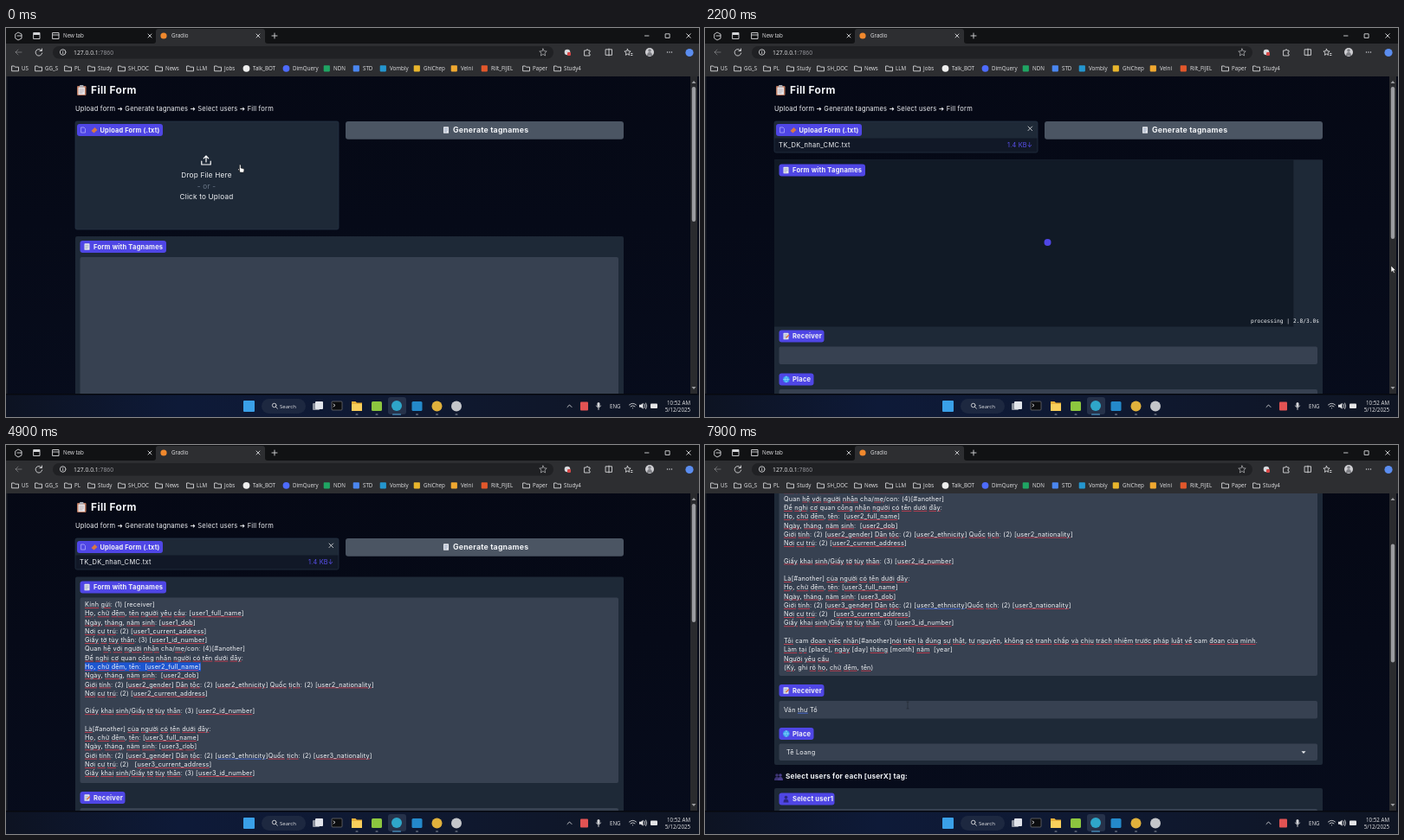
An HTML page that plays this animation: 800 by 450 pixels, repeating every 8000 ms.

```html
<!DOCTYPE html>
<html lang="en">
<head>
<meta charset="utf-8">
<title>Fill Form</title>
<style>
  html, body { margin: 0; width: 100%; height: 100%; overflow: hidden; background: #050916; }
  svg { display: block; width: 800px; height: 450px; }
  text { font-family: Inter, "Open Sans", sans-serif; fill: #f1f3f6; letter-spacing: .2px; white-space: pre; }
  .b { font-weight: 700; }
  .ui { font-family: "Open Sans", "Noto Sans", sans-serif; letter-spacing: 0; fill: #e4e4e6; }
  .mono { font-family: "DejaVu Sans Mono", "Liberation Mono", monospace; letter-spacing: 0; }
  .bad { fill: #e23b4e; text-decoration: underline; }
  .hint { fill: #4b74f0; text-decoration: underline; }
  .ok { fill: #f1f3f6; text-decoration: none; }
  .line { fill: none; stroke: #d6d7da; stroke-width: .9; stroke-linecap: round; stroke-linejoin: round; }
</style>
</head>
<body>
<svg id="stage" viewBox="0 0 800 450" xmlns="http://www.w3.org/2000/svg"></svg>
<script>
const LOOP = 8000, INDIGO = '#4f46e5', PANEL = '#1e2937', FIELD = '#374151';

const FORM = `CỘNG HOÀ XÃ HỘI CHỦ NGHĨA VIỆT NAM
  Độc lập - Tự do - Hạnh phúc

TỜ KHAI ĐĂNG KÝ NHẬN CHA, MẸ, CON

Kính gửi: (1) [receiver]
Họ, chữ đệm, tên người yêu cầu: [user1_full_name]
Ngày, tháng, năm sinh: [user1_dob]
Nơi cư trú: (2) [user1_current_address]
Giấy tờ tùy thân: (3) [user1_id_number]
Quan hệ với người nhận cha/mẹ/con: (4)[#another]
Đề nghị cơ quan công nhận người có tên dưới đây:
Họ, chữ đệm, tên:  [user2_full_name]
Ngày, tháng, năm sinh:  [user2_dob]
Giới tính: (2) [user2_gender] Dân tộc: (2) [user2_ethnicity] Quốc tịch: (2) [user2_nationality]
Nơi cư trú: (2) [user2_current_address]

Giấy khai sinh/Giấy tờ tùy thân: (3) [user2_id_number]

Là[#another] của người có tên dưới đây:
Họ, chữ đệm, tên: [user3_full_name]  
Ngày, tháng, năm sinh: [user3_dob]
Giới tính: (2) [user3_gender] Dân tộc: (2) [user3_ethnicity]Quốc tịch: (2) [user3_nationality]
Nơi cư trú: (2)   [user3_current_address]
Giấy khai sinh/Giấy tờ tùy thân: (3) [user3_id_number]

Tôi cam đoan việc nhận[#another]nói trên là đúng sự thật, tự nguyện, không có tranh chấp và chịu trách nhiệm trước pháp luật về cam đoan của mình.
Làm tại [place], ngày [day] tháng [month] năm  [year]
Người yêu cầu
(Ký, ghi rõ họ, chữ đệm, tên)`.split('\n');
const RECEIVER = 'Văn thư Tổ', PLACE = 'Tê Loang';

// Markup helpers
const rect = (x, y, w, h, fill, r = 0, extra = '') =>
  `<rect x="${x}" y="${y}" width="${w}" height="${h}" rx="${r}" fill="${fill}" ${extra}/>`;
const circle = (x, y, r, fill) => `<circle cx="${x}" cy="${y}" r="${r}" fill="${fill}"/>`;
const line = (d, extra = '') => `<path class="line" d="${d}" ${extra}/>`;
const text = (x, y, s, size, extra = '') => `<text x="${x}" y="${y}" font-size="${size}" ${extra}>${s}</text>`;
const ui = (x, y, s, size = 6.2, extra = '') => text(x, y, s, size, `class="ui" ${extra}`);
const bold = (x, y, s, size, extra = '') => text(x, y, s, size, `class="b" ${extra}`);
const page = (x, y, fill = '#e6e8ee') =>
  rect(x, y, 6, 7.5, fill, .6) + line(`M${x + 1.3} ${y + 2}h3.2m-3.2 1.8h3.2m-3.2 1.8h2.2`, 'style="stroke:#7386a8;stroke-width:.6"');
const badge = (x, y, w, label, icon) => rect(x, y, w, 14, INDIGO, 3) + icon + bold(x + 15.5, y + 9.6, label, 7.55);
const person = (x, y, fill) => circle(x, y - 2, 1.8, fill) + `<path d="M${x - 3} ${y + 4}q0-4 3-4t3 4z" fill="${fill}"/>`;
const cross = (x, y, r = 2) => line(`M${x - r} ${y - r}l${2 * r} ${2 * r}m0 ${-2 * r}l${-2 * r} ${2 * r}`);

function spellcheck(s) {
  return s.replace(/[\p{L}\d_]+/gu, word => {
    const wrong = /[^\x00-\x7f]|_|^(sinh|khai|KHAI|tranh|NAM)$/.test(word);
    const kind = /^user3_eth/.test(word) ? 'hint' : 'bad';
    return wrong ? `<tspan class="${kind}"><tspan class="ok">${word}</tspan></tspan>` : word;
  });
}

function browser() {
  const folders = [[18, 'US'], [45, 'GG_S'], [79, 'PL'], [106, 'Study'], [141, 'SH_DOC'], [184, 'News'],
    [220, 'LLM'], [252, 'Jobs'], [608, 'Paper'], [644, 'Study4']];
  const sites = [[285, 'Talk_BOT', '#eeeeee', 1], [331, 'DimQuery', '#4d6bfe', 1], [378, 'NDN', '#1fa463'],
    [412, 'STD', '#4a86f0'], [443, 'Vombly', '#2496cf'], [482, 'GhiChep', '#e8b52c'],
    [525, 'Velni', '#f0a830'], [560, 'Rilt_FIJEL', '#e2572b']];
  return rect(0, 0, 800, 56, '#111214') +
    `<path d="M170 18q3 0 3-3v-11q0-3 3-3h120q3 0 3 3v11q0 3 3 3z" fill="#2d2e31"/>` +
    rect(0, 18, 800, 38, '#2d2e31') + rect(54, 21, 578, 14.5, '#202124', 7) +
    line('M11 7l3-2 4 2v5l-4 2-3-2zM13 9h5M32 5.5h7v7h-7z') + rect(32, 5.5, 7, 2.5, '#d6d7da') +
    line('M54 5.5h7v7h-7zm0 2.5h7') + ui(66, 11.3, 'New tab') + cross(166, 9) +
    circle(182, 9, 3.6, '#f0882d') + ui(191, 11.3, 'Gradio') + cross(291, 9) + line('M307 9h6m-3-3v6') +
    line('M737.5 9h4.5M761.5 6.8h4.6v4.6h-4.6z') + cross(788, 9, 2.3) +
    line('M18 28h-7l3-3m-3 3l3 3', 'opacity=".4"') + line('M41 26a3.8 3.8 0 1 0 .7 3M41.5 24v2.5h-2.5') +
    line('M69 28a3.3 3.3 0 1 0-6.6 0a3.3 3.3 0 1 0 6.6 0M65.7 27.8v1.7m0-3.2v.1') +
    ui(78, 30.5, '127.0.0.1<tspan fill="#9a9ba0">:7860</tspan>', 6.8) +
    line('M620 24l1.2 2.7 3 .3-2.2 2 .6 3-2.6-1.6-2.6 1.6.6-3-2.2-2 3-.3z', 'opacity=".65"') +
    circle(648, 28, 3.3, '#d9d9dd') + rect(648, 28, 4, 4, '#d94848', 1) +
    line('M668 26h2q1-3 2 0h2v2q-3 1 0 2v2h-6z') + line('M692.5 24.8h7v6.5h-7zM696 24v8') +
    line('M717.5 24.3l1 2.4 2.6.3-2 1.8.5 2.6-2.1-1.3-2.1 1.3.5-2.6-2-1.8 2.6-.3zM721.5 29.5h1.5m-1.5 2h1.5') +
    circle(743, 28, 5, '#cfcfd3') + person(743, 28, '#7f8085') +
    [763.5, 766, 768.5].map(x => circle(x, 28, .7, '#d6d7da')).join('') + circle(789, 28.5, 4.6, '#5b8def') +
    folders.map(([x, s]) => line(`M${x - 11} 44h2.5l1 1.2h4v4.6h-7.5z`) + ui(x, 49, s)).join('') +
    sites.map(([x, s, c, round]) =>
      (round ? circle(x - 7.5, 46.8, 3.9, c) : rect(x - 11.3, 43.2, 7.2, 7.2, c, .8)) + ui(x, 49, s)).join('');
}

function taskbar() {
  const apps = [[428, '#8cc63f'], [474.5, '#2489ca']];
  return rect(0, 423, 800, 27, 'url(#dusk)') + rect(0, 423, 800, 1.5, '#07090f') +
    rect(274, 431, 13, 13, '#3aa0e8', 1) + rect(295, 429, 51, 17, '#1d2840', 8.5) +
    line('M312 436.5a2.3 2.3 0 1 0-4.6 0a2.3 2.3 0 1 0 4.6 0M311.4 438.2l2 2') + ui(316, 440, 'Search', 6) +
    rect(354, 434, 8, 8, '#8b919d', 1) + rect(357, 432, 9, 9, '#e1e4ea', 1) +
    rect(376, 432, 12, 10, '#0b0c0e', 1, 'stroke="#777" stroke-width=".7"') + line('M378 435l2 1.5-2 1.5') +
    '<path d="M399 432h4.5l1.5 1.5h6v9.5h-12z" fill="#e9b13a"/>' + rect(399, 435, 12, 8, '#f8cf5c', .8) +
    rect(441, 427, 21, 20, '#26324a', 3) +
    apps.map(([x, c]) => rect(x - 6, 432, 12, 11, c, 1.5)).join('') +
    circle(451, 437, 6, '#2fa6c9') + circle(497.5, 437.5, 6, '#e0b13c') + circle(520, 437.5, 6, '#c4c6ca') +
    [405, 428, 474.5, 497.5, 520].map(x => rect(x - 1.5, 446.5, 3, 1, '#8d949f', .5)).join('') +
    rect(446, 446.5, 10, 1, '#58b4e8', .5) +
    line('M648 438.5l2.5-2.5 2.5 2.5') + rect(663, 432.5, 9, 10, '#e25353', 1) +
    rect(682.5, 433, 3, 5.5, '#d6d7da', 1.5) + line('M681.5 437q2.5 4.5 5 0M684 439.5v2') +
    ui(697, 439.8, 'ENG') + line('M719.5 436q4-3.5 8 0M721 437.8q2.5-2 5 0M723.4 439.8h.2') +
    `<path d="M731 435.7h2l2.5-2v7l-2.5-2h-2z" fill="#e4e4e6"/>` + line('M737 435q1.5 2.2 0 4.5M738.7 434q2 3.2 0 6.5') +
    rect(744, 434.5, 8, 5.5, '#e4e4e6', 1) +
    ui(790, 435.5, '10:52 AM', 6.2, 'text-anchor="end"') + ui(790, 443.5, '5/12/2025', 6.2, 'text-anchor="end"');
}

const uploadBadge = rect(82, 111, 99, 14, INDIGO, 3) + line('M87 115h3l1.5 1.5v4.5h-4.5z', 'style="stroke:#b9b5ff;stroke-width:.7"') +
  `<path d="M98.5 119l4-4 3 3-4 3.5z" fill="#d87845"/>` + bold(108.5, 120.7, 'Upload Form (.txt)', 7.4);

const dropZone = rect(80, 108, 304, 125, PANEL, 2, 'stroke="#283548" stroke-width=".7"') +
  line('M231 155v-7m-2.8 2.8l2.8-2.8 2.8 2.8M225.8 154v4h10.4v-4', 'style="stroke:#fff;stroke-width:1.2"') +
  text(231.5, 173, 'Drop File Here', 8.2, 'text-anchor="middle"') +
  text(231.5, 185.8, '- or -', 8.2, 'text-anchor="middle" style="fill:#6b7789"') +
  text(231.5, 198.2, 'Click to Upload', 8.2, 'text-anchor="middle"');

const uploadedFile = rect(80, 108, 304, 36, PANEL, 2, 'stroke="#283548" stroke-width=".7"') +
  rect(80.5, 127.5, 303, 16, '#111827') + cross(375.3, 116.3, 2.3) +
  text(85, 138.3, 'TK_DK_nhan_CMC.txt', 7.5, 'style="letter-spacing:.3px"') +
  text(378, 138.3, '1.4 KB↓', 7.3, 'text-anchor="end" style="fill:#5a50ee"');

const clipboard = rect(82, 67, 10.5, 11, '#b9785f', 1.2) + rect(83.5, 68.5, 7.5, 8.5, '#e8e3e6', .5) +
  rect(85, 66, 4.5, 2.5, '#a9adb6', .8) + line('M85 71h4.5m-4.5 2h4.5m-4.5 2h3', 'style="stroke:#9b8f99;stroke-width:.6"');
const globe = circle(93.8, 7, 3.7, '#35a3ec') + line('M90.5 7h6.6M93.8 3.5q-3 3.5 0 7q3-3.5 0-7', 'style="stroke:#b6e2ff;stroke-width:.5"');
const pencil = '<path d="M93 8.5l3.5-3.5 1 1-3.5 3.5z" fill="#e0703d"/>';

const lower = badge(85.5, 10, 52, 'Receiver', page(90.5, 13.3) + `<g transform="translate(0,10)">${pencil}</g>`) +
  rect(85.5, 29, 621.5, 20.5, FIELD, 2) + '<g id="receiver"></g>' +
  badge(85.5, 60, 40, 'Place', `<g transform="translate(0,60)">${globe}</g>`) +
  rect(85.5, 78.5, 621.5, 19.5, FIELD, 2) + text(94, 90.8, PLACE, 7.3) +
  '<path d="M688.5 87.2h5l-2.5 2.7z" fill="#e8eaee"/>' +
  person(83, 117, '#3d3474') + person(87, 117, '#4a3f8c') + bold(93, 119, 'Select users for each [userX] tag:', 8.2) +
  rect(80, 130, 633, 120, PANEL, 2) + badge(85.5, 135.5, 64, 'Select user1', person(93.5, 142.5, '#2c2780')) +
  rect(85.5, 154, 621.5, 20, FIELD, 2);

const stage = document.getElementById('stage');
stage.innerHTML = `
  <defs>
    <clipPath id="view">${rect(0, 56, 800, 367, '#000')}</clipPath>
    <clipPath id="boxClip"><rect id="boxClipRect" x="85.5" y="24" width="621.5" height="163"/></clipPath>
    <linearGradient id="night" x2="0" y2="1"><stop stop-color="#050814"/><stop offset="1" stop-color="#070c1c"/></linearGradient>
    <linearGradient id="dusk">
      <stop stop-color="#0d1322"/><stop offset=".25" stop-color="#0e1a38"/>
      <stop offset=".55" stop-color="#0f1932"/><stop offset="1" stop-color="#0f1523"/>
    </linearGradient>
  </defs>
  ${rect(0, 0, 800, 450, 'url(#night)')}
  <g clip-path="url(#view)"><g id="page">
    ${clipboard}${bold(98, 76, 'Fill Form', 12, 'style="letter-spacing:.35px"')}
    ${text(80, 96.3, 'Upload form ➜ Generate tagnames ➜ Select users ➜ Fill form', 7.5)}
    <g id="drop">${dropZone}</g><g id="file">${uploadedFile}</g>${uploadBadge}
    <rect id="button" x="392" y="108" width="321" height="20.7" rx="3"/>
    ${page(505, 114.3)}${bold(516, 121.2, 'Generate tagnames', 8.75)}
    <g id="form">
      <rect id="panel" x="80" y="0" width="633" rx="2" fill="${PANEL}"/>
      <rect id="box" x="85.5" y="24" width="621.5" rx="2" fill="${FIELD}"/>
      <g clip-path="url(#boxClip)"><g id="content">
        <rect id="selection" height="10.2" fill="#1c55d0"/>
        ${FORM.map((s, i) => text(91, 36 + 10.27 * i, spellcheck(s), 7.3, 'data-line')).join('')}
      </g></g>
      <g id="lower">${lower}</g>
      <g id="progress">
        ${rect(80, 0, 633, 193, PANEL)}<rect id="bar" x="80" y="0" height="193" fill="#111a26"/>
        ${circle(395.5, 95.5, 4, INDIGO)}
        <text id="timer" class="mono" x="709" y="188" font-size="6.25" text-anchor="end"></text>
      </g>
      ${badge(85.5, 5, 99.5, 'Form with Tagnames', page(90.5, 8.3))}
    </g>
  </g></g>
  ${rect(790, 56, 8, 367, '#2a2b2e')}
  <path d="M791.5 64h5l-2.5-3zM791.5 415h5l-2.5 3z" fill="#9b9ca0"/>
  <rect id="thumb" x="791.8" width="4.4" rx="2.2" fill="#9b9ca0"/>
  ${rect(0, 56, 1.5, 367, '#1d2028')}${browser()}${taskbar()}
  <g id="popup">${rect(-5, -5, 10, 10, '#e3e8f3', 1.5)}${rect(-3.2, -3.2, 4, 4, '#55729f', .5)}${rect(-.5, -.5, 4, 4, '#3f5f92', .5)}</g>
  <path id="arrow" d="M0 0v7.5l1.8-1.6 1.2 2.7 1.3-.6-1.2-2.6h2.4z" fill="#fff" stroke="#111" stroke-width=".5"/>
  <path id="hand" d="M-1.5 4v-7q0-1 .8-1t.8 1v3l3 .8q1 .3.8 1.5l-.5 2.7h-4l-2.6-3.5q.5-1.2 1.7 0z" fill="#fff" stroke="#111" stroke-width=".5"/>
  <path id="beam" d="M-1.5-4h3M0-4v8M-1.5 4h3" fill="none" stroke="#14181f" stroke-width=".7" opacity=".6"/>`;

const el = {};
stage.querySelectorAll('[id]').forEach(node => el[node.id] = node);
const lineNodes = stage.querySelectorAll('[data-line]');
const set = (node, attrs) => { for (const key in attrs) node.setAttribute(key, attrs[key]); };
const show = (node, on) => node.setAttribute('display', on ? 'inline' : 'none');
const move = (node, x, y) => node.setAttribute('transform', `translate(${x},${y})`);
const clamp = v => Math.max(0, Math.min(1, v));

// Eased value along [time, value] keys
function track(keys, t, part = 1) {
  const i = keys.findIndex(key => key[0] > t);
  if (i < 0) return keys[keys.length - 1][part];
  if (i === 0) return keys[0][part];
  const a = keys[i - 1], b = keys[i], p = (t - a[0]) / (b[0] - a[0]);
  return a[part] + (b[part] - a[part]) * p * p * (3 - 2 * p);
}

const UPLOADED = 600, CLICKED = 1100, READY = 2400;
const POINTER = [[0, 271, 162], [300, 235, 166], [600, 235, 166], [1000, 605, 117], [1150, 605, 117],
  [2200, 793, 279], [2450, 793, 279], [2900, 276, 248], [3050, 276, 248], [3400, 91, 248], [3600, 64, 251],
  [3750, 64, 251], [4050, 226, 309], [4400, 91, 309], [4900, 206, 349], [5020, 227, 339], [5250, 91, 339],
  [5700, 756, 272], [6000, 756, 272], [6400, 234, 306], [7000, 234, 301]];
const TEXT_SCROLL = [[4500, 0], [4800, 52.7], [5330, 52.7], [5550, 102.5]];
const PAGE_SCROLL = [[5550, 0], [5850, 56], [5950, 56], [6250, 124]];
const SELECTIONS = [[6, 3050, 3400, 4000], [12, 4050, 4400, 5000], [20, 5020, 5250, 6450]];

function render(t) {
  const uploaded = t >= UPLOADED, ready = t >= READY, busy = t >= CLICKED && !ready;
  const x = track(POINTER, t), y = track(POINTER, t, 2);
  const scroll = track(PAGE_SCROLL, t), textScroll = track(TEXT_SCROLL, t);
  const top = uploaded ? 152.5 : 241, boxHeight = ready ? 214.5 : 163, bottom = 24 + boxHeight;

  move(el.page, 0, -scroll);
  show(el.drop, !uploaded);
  show(el.file, uploaded);
  move(el.form, 0, top);
  set(el.panel, { height: bottom + 103 });
  set(el.box, { height: boxHeight });
  set(el.boxClipRect, { height: boxHeight });
  move(el.lower, 0, bottom);
  show(el.content, ready);
  move(el.content, 0, -textScroll);

  const onButton = x > 392 && x < 713 && y > 108 && y < 129 && !scroll;
  set(el.button, { fill: onButton ? '#5a54dc' : '#4b5563' });

  show(el.progress, busy);
  const seconds = Math.max(0, 2.8 + (t - 2200) * .00255);
  el.timer.textContent = `processing | ${seconds.toFixed(1)}/3.0s`;
  set(el.bar, { width: 633 * clamp(seconds / 2.96) });

  const picked = SELECTIONS.find(([, from, , until]) => t >= from && t < until);
  show(el.selection, picked);
  if (picked) {
    const [row, from, to] = picked;
    const full = lineNodes[row].getComputedTextLength(), width = full * track([[from, 0], [to, 1]], t);
    set(el.selection, { x: 91 + full - width, y: 28.4 + 10.27 * row, width });
  }

  const typed = RECEIVER.slice(0, Math.max(0, Math.floor((t - 6800) / 80)));
  el.receiver.innerHTML = text(91, 41.8, typed.replace('thư', '<tspan class="hint"><tspan class="ok">thư</tspan></tspan>'), 7.3);

  const thumb = ready ? 137 : uploaded ? 176 : 156;
  set(el.thumb, { y: 68 + scroll * .374, height: thumb });

  const early = t >= 3600 && t < 3950, late = t >= 5350 && t < 6400;
  show(el.popup, early || late);
  move(el.popup, early ? 129.5 : 159.5, early ? 252 : 349);

  const overDrop = !uploaded && x < 384 && y > 108 && y < 233;
  const overText = x > 86 && x < 707 && !busy && y > 176 && y < 391;
  const kind = overDrop || onButton ? 'hand' : overText ? 'beam' : 'arrow';
  for (const name of ['arrow', 'hand', 'beam']) {
    show(el[name], name === kind);
    const tip = name === 'arrow';
    move(el[name], tip ? x - 1 : x, tip ? y - 4 : y);
  }
}

const start = performance.now();
function frame() {
  render((performance.now() - start) % LOOP);
  requestAnimationFrame(frame);
}
render(0);
requestAnimationFrame(frame);
</script>
</body>
</html>
```
